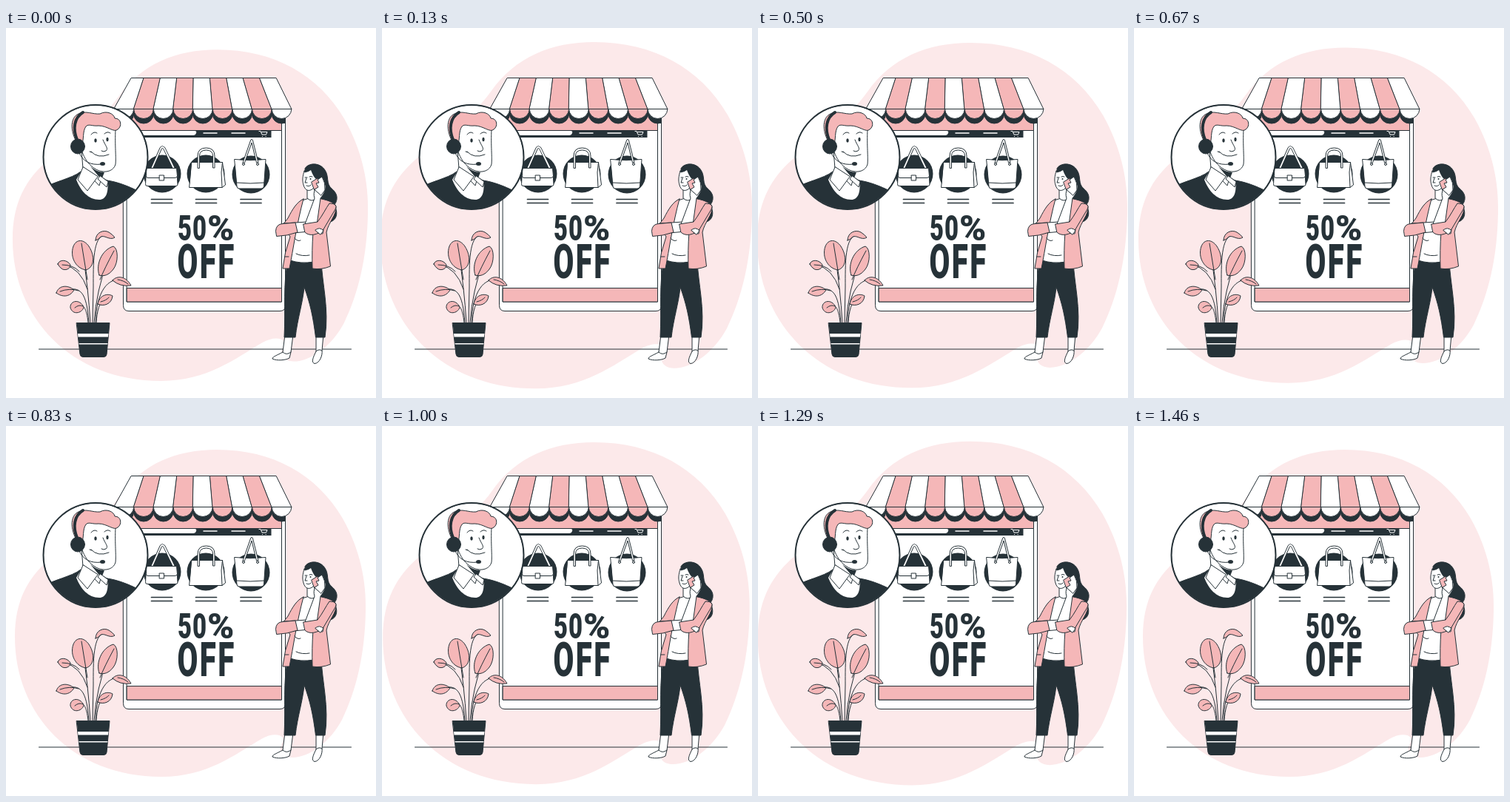
Animation, 500 px wide and 500 px high, one loop 1540 ms. Source, as an HTML page:

```html
<!DOCTYPE html>
<html lang="en">
<head>
<meta charset="utf-8">
<title>Half-price shop</title>
<style>
  html, body { margin: 0; width: 100%; height: 100%; overflow: hidden; background: #fff; }
  svg { display: block; width: 100%; height: 100%; }
  .art { fill: #fff; stroke: #263238; stroke-width: 1; stroke-linejoin: round; stroke-linecap: round; }
  .pink { fill: #f5b7b8; }
  .dark { fill: #263238; }
  .line { fill: none; }
  .light { fill: none; stroke: #fff; }
  .flat { stroke: none; }
  text { fill: #263238; stroke: none; font: 900 49px Roboto, sans-serif; }
</style>
</head>
<body>
<svg viewBox="0 0 500 500">
  <defs>
    <clipPath id="lens"><circle cx="121" cy="174.500" r="70"/></clipPath>
    <clipPath id="screen"><path d="M159 100H378V150H159Z"/></clipPath>
  </defs>

  <path id="blob" fill="#fce9ea" d="M285 32C360 32 420 65 455 125C479 168 487 210 486 250C485 310 473 358 454 397C438 427 410 448 387 448C372 448 367 437 373 429C380 417 362 413 345 423C309 444 272 474 210 474C90 474 12 390 12 285C12 237 29 205 60 179C92 152 128 130 153 95C184 51 230 32 285 32Z"/>

  <g class="art">
    <path class="line" d="M44.500 434H466.500"/>

    <g id="shop">
      <path d="M158.500 108H377.500V375Q377.500 382.500 370 382.500H166Q158.500 382.500 158.500 375Z"/>
      <path d="M163.500 108H372.500V370H163.500Z"/>
      <path class="pink" d="M163.500 351.500H372.500V370H163.500ZM163.500 108H372.500V138.500H163.500Z"/>
      <path class="dark flat" d="M163.500 139H358.500V148H163.500Z"/>
      <path class="flat" d="M164 139H255Q258 139 257 142Q256 145 253 145H164Z"/>
      <path class="light" style="stroke-width:1.500" d="M267 142H285M305 142H323"/>
      <path class="light" d="M342 139.500H344L346 144H351.500L353 140.500H345M346.500 146.500h.2M351 146.500h.2"/>
      <g id="shadow" class="dark" clip-path="url(#screen)"></g>
      <g id="awning"></g>
    </g>

    <g id="goods">
      <g class="dark flat">
        <circle cx="211" cy="197" r="25.500"/>
        <circle cx="270" cy="197" r="25.500"/>
        <circle cx="331" cy="198" r="25.500"/>
      </g>
      <path class="line" style="stroke-width:3.500" d="M197 190L209 163Q211 159 214 163L227 190"/>
      <path class="light" style="stroke-width:1.800" d="M197 190L209 163Q211 159 214 163L227 190"/>
      <path d="M190 189.500H230.500L232 211Q232 213.500 230 213.500H191Q188 213.500 188.500 211Z"/>
      <path d="M190 189.500H230.500L231.500 200Q231 202.500 228 202.500H192Q189 202.500 189.500 200Z"/>
      <path d="M207.500 199H213.500V206H207.500Z"/>
      <path d="M251 181.500H292.500L296.500 212L292 215.500H248Z"/>
      <path class="line" d="M292.500 181.500L291 195L292 215.500"/>
      <path d="M259 189V173Q259 162 270.500 162Q282 162 282 173V189H279.500V173Q279.500 165 270.500 165Q261.500 165 261.500 173V189Z"/>
      <path d="M309 177.500Q330 180 351 177.500L348.500 214Q348 217 345 217H315Q312 217 312 214Z"/>
      <path class="line" d="M311.500 209Q330 211 349 209"/>
      <path d="M320 182L330.500 152Q332 148.500 333.500 152L341 182L338.500 182L332 155L322.500 182Z"/>
      <circle cx="321" cy="184" r="1.500"/><circle cx="340" cy="184" r="1.500"/>
      <path class="line" style="stroke-width:1.700" d="M196.500 231.500H224.500M196.500 236.500H224.500M256.500 231.500H284.500M256.500 236.500H284.500M317 231.500H345M317 236.500H345"/>
    </g>

    <g id="offer">
      <text transform="translate(232 286.500) scale(.67 1)" letter-spacing="1.500">50</text>
      <text x="272" y="286.500">%</text>
      <text transform="translate(231.500 337.500) scale(.62 1)" letter-spacing="4" style="font-size:65px">OFF</text>
    </g>

    <g id="agent">
      <circle cx="121" cy="174.500" r="70.500"/>
      <g clip-path="url(#lens)">
        <path class="dark" d="M45 219C65 207 88 204 101 194L137 206C150 208 164 213 180 221V250H45Z"/>
        <path class="flat" d="M95 205C101 220 111 232 126 232C135 232 139 222 137 207L104 190Z"/>
        <path d="M102 165L104 190L126 213L131 196Z"/>
        <path class="dark flat" d="M114 187C121 193 127 195 133 195L129 205Z"/>
        <path d="M104 188L97 205L110 220L124 201ZM127 200L124 204L136 215L138 208Z"/>
        <path d="M98 135C99 165 106 181 120 190C131 197 145 195 148 184C149 174 147 160 148 136L130 122Z"/>
        <path class="pink" d="M99 160C86 142 86 121 98 116C108 111 117 117 127 116C136 111 146 116 147 122C156 122 157 133 151 137C146 142 137 132 125 132C116 133 112 129 108 133C103 140 106 150 102 160Z"/>
        <path class="line" d="M115 144Q119 139 123 142M133 143Q137 139 141 142M131 151C134 159 139 163 135 166Q132 168 129 166M115 167Q124 177 139 171M113 167l3 1"/>
        <ellipse class="dark flat" cx="121" cy="152" rx="1.700" ry="2.800"/>
        <ellipse class="dark flat" cx="137" cy="150.500" rx="1.600" ry="2.800"/>
        <path class="line" style="stroke-width:4" d="M96 151C90 136 92 121 104 114"/>
        <ellipse class="dark" cx="97" cy="160" rx="9.500" ry="10"/>
        <path class="line" d="M99 169C104 180 114 186 129 184"/>
        <ellipse class="dark flat" cx="130.500" cy="183.500" rx="3.500" ry="2.500"/>
      </g>
      <circle class="line" cx="121" cy="174.500" r="70.500" style="stroke-width:2"/>
    </g>

    <g id="plant">
      <path class="line" d="M104 307Q111 350 114 398M138 312Q122 355 119 398M134 280C117 280 118 320 118 350L117 398M157 341C138 336 122 356 121 398M80 355C100 348 109 356 112 398M95 377C105 371 109 379 111 398M134 366C126 369 123 383 122 398M79 320Q101 325 110 353"/>
      <g class="pink">
        <path d="M121 287C121 276 132 272 139 276Q144 279 147 283C140 288 132 278 127 283Q125 286 121 287Z"/>
        <path d="M108 327C94 325 86 309 91 295C95 285 105 285 112 295C121 309 119 324 108 327Z"/>
        <path d="M126 334C121 320 129 300 145 295C152 298 152 317 145 326C139 334 132 336 126 334Z"/>
        <path d="M70 319C72 312 83 313 87 320C87 327 78 328 75 325Q72 323 70 319Z"/>
        <path d="M144 341C150 334 162 335 169 348Q154 350 144 341Z"/>
        <path d="M68 358C71 347 84 347 92 354C86 364 76 364 68 358Z"/>
        <path d="M104 375C97 365 86 370 87 378C90 388 102 386 105 378Z"/>
        <path d="M124 373C126 361 137 358 144 362C143 373 132 377 124 373Z"/>
      </g>
      <path class="line" d="M102 291L110 340M146 301Q133 325 127 340M76 320Q91 320 99 329M151 340Q159 341 165 346M73 356Q86 351 98 355M93 378Q99 373 104 376M128 370Q136 368 139 364"/>
      <path class="dark" d="M95.500 398.500H140L136 441Q135.500 444.500 132 444.500H104Q100.500 444.500 100 441Z"/>
      <path class="flat" d="M97 413H138.500L138 417.500H97.500ZM98.500 426H137.500L137.300 427.500H98.700Z"/>
    </g>

    <g id="caller">
      <path class="dark" d="M404 190C408 182 424 181 431 192C437 201 432 210 440 217C450 225 448 234 443 240C450 248 447 262 436 262C425 262 424 246 426 236L415 216Z"/>
      <path d="M377 414L374 438C367 442 360 444 360 447C366 450 378 449 383 446L385 438L388 414ZM419 414L419 437C415 445 412 452 417 453.500C424 453 428 442 427 436L429 414Z"/>
      <path class="line" d="M374 438Q379 443 385 438M419 437Q423 433 427 436"/>
      <path class="dark" d="M381 314H426C427 345 437 380 431 418H418.500C415 390 411 372 403 350C401 372 394 392 391 418H376C378 380 374 345 381 314Z"/>
      <path d="M400 233L413 229L422 236L416 316Q398 319 384 314Z"/>
      <path class="pink" d="M402 231C393 235 387 245 381 257L374 266L384 282Q376 304 374 325H383C388 300 393 264 402 231Z"/>
      <path class="pink" d="M421 230C433 232 443 235 446 241C447 253 436 262 433 276L438.500 322Q426 327 414 325C413 292 415 262 421 230Z"/>
      <path d="M407 214L407 230Q413 236 420 230L420 210Z"/>
      <path d="M403 193C401 201 400 205 402 212C404 220 410 222 416 216L422 205L414 191Z"/>
      <path class="dark flat" d="M403 195C404 184 421 179 430 191L432 207L423 206C417 205 414 197 412 192Q407 196 403 195Z"/>
      <path class="line" d="M404 202h3M410 201q2-1 4 0M406 203l-2 6h3M406 213q4 2 6-1"/>
      <circle class="dark flat" cx="411.500" cy="204" r="1"/>
      <path d="M375 264L407 262C419 264 425 268 429 272L428 278C420 278 417 274 410 275L377 278Z"/>
      <path class="pink" d="M364.500 274Q365 265 374 264.500L391 263L394 276Q380 281 366 281.500Z"/>
      <path d="M404 265L417 230C414 221 419 215 424 210L431 210C434 216 430 224 425 230L420 266Q413 280 405 275Z"/>
      <path class="pink" d="M413 208L421 203L426 214L417 219Z"/>
      <path d="M417 218L422 215L419 210L423 209L421 205L427 201Q432 209 431 219L426 226Z"/>
      <path class="pink" d="M402 265L421 262C428 253 432 244 437 237Q449 237 445 245L429 272C422 280 409 282 404 276Z"/>
      <path d="M418 273Q424 268 429 274L425 279Z"/>
      <path class="line" d="M390 284q4 5 8 3M392 305q8 4 18 2M377 309h5"/>
    </g>
  </g>
</svg>

<script>
  const LOOP = 1540;
  const blob = document.getElementById("blob");
  // [ms, swell]: two uneven beats with a short rest after each.
  const beats = [[-35, 0], [245, 1], [815, 0], [885, 0], [1140, 1], [1450, 0], [1505, 0], [1785, 1]];

  function addPath(parent, d, className) {
    const path = document.createElementNS("http://www.w3.org/2000/svg", "path");
    path.setAttribute("d", d);
    if (className) path.setAttribute("class", className);
    document.getElementById(parent).append(path);
  }

  function buildAwning() {
    const stripes = 9;
    const top = i => Math.max(169.500, 164 + i * 22.350);
    const bottom = i => 146 + i * 26.650;
    for (let i = 0; i < stripes; i++) {
      const left = bottom(i), right = bottom(i + 1), tint = i % 2 ? "pink" : "";
      addPath("shadow", `M${left} 112V116A13.300 13 0 0 0 ${right} 116V112Z`);
      addPath("awning", `M${left} 109.500A13.300 13 0 0 0 ${right} 109.500Z`, tint);
      addPath("awning", `M${top(i)} 67.500H${top(i + 1)}L${right} 109.500H${left}Z`, tint);
    }
  }

  function swell(t) {
    const i = beats.findIndex(([time]) => time > t);
    const [t0, a] = beats[i - 1], [t1, b] = beats[i];
    return a + (b - a) * (t - t0) / (t1 - t0);
  }

  function draw() {
    const scale = 1 + 0.1 * swell(performance.now() % LOOP);
    blob.setAttribute("transform", `translate(250 250) scale(${scale}) translate(-250 -250)`);
    requestAnimationFrame(draw);
  }

  buildAwning();
  draw();
</script>
</body>
</html>
```
